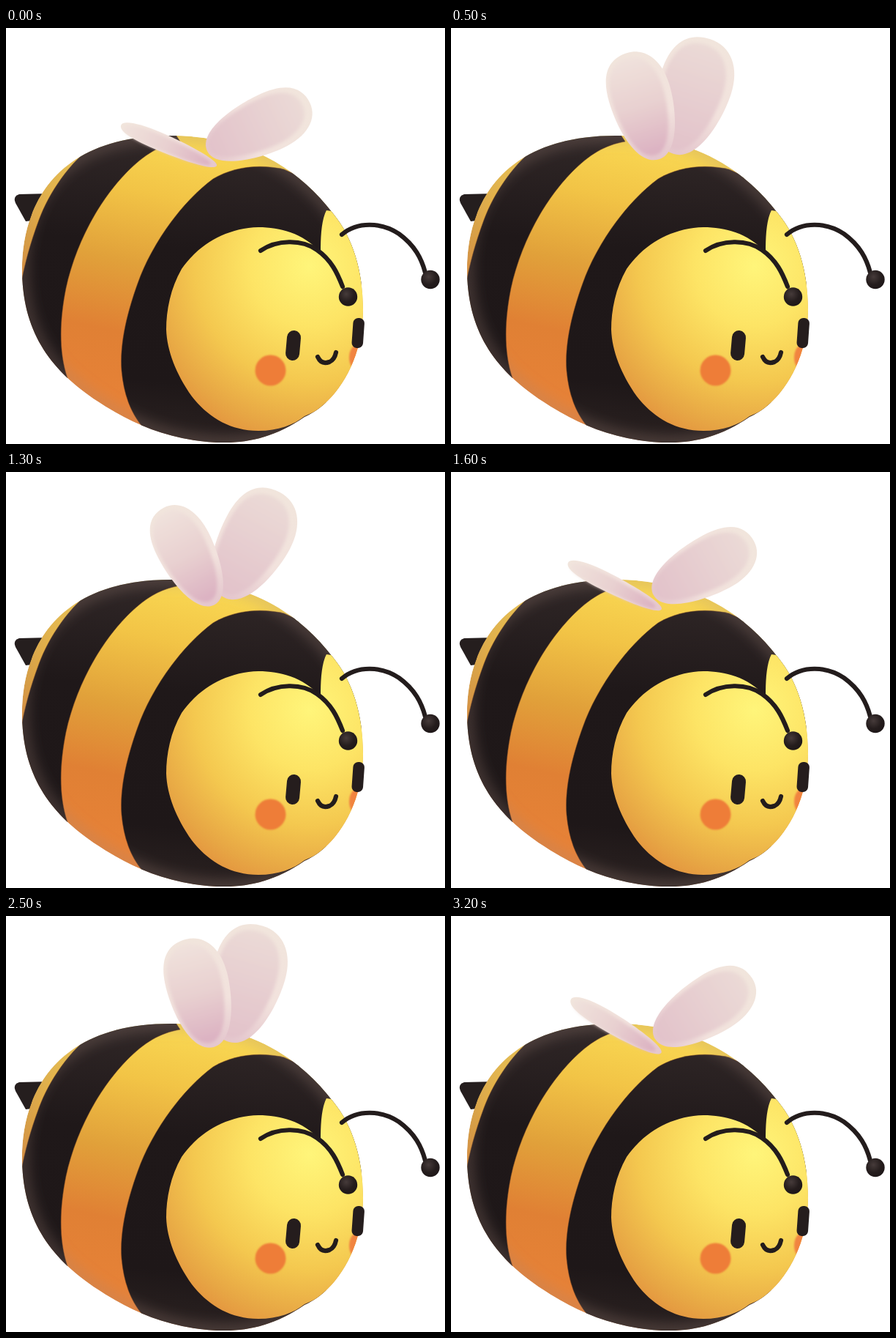
Write an HTML page that moves like this. It is 600 by 568 pixels and loops after 3.3 s.

```html
<!DOCTYPE html>
<html lang="en">
<head>
<meta charset="utf-8">
<title>Bee</title>
<style>
html, body { margin: 0; width: 100%; height: 100%; overflow: hidden; background: #fff; }
svg { display: block; width: 600px; height: 568px; }
.line { fill: none; stroke: #231c1c; stroke-width: 6.2; stroke-linecap: round; }
</style>
</head>
<body>
<svg viewBox="0 0 600 568">
  <defs>
    <path id="body" d="M22 335C20 250 62 147 225 147C330 147 400 192 446 252C473 284 488 330 488 385C488 450 455 510 408 531C370 557 335 566 300 566C240 566 190 548 150 525C75 482 24 430 22 335Z"/>
    <path id="face" d="M430 306C405 280 375 272 345 272C300 273 262 297 240 329C225 355 219 385 219 412C220 440 232 472 254 503C275 530 305 550 345 550C372 550 393 542 408 530L520 480L510 260L438 249C431 262 430 285 430 306Z"/>
    <clipPath id="inBody"><use href="#body"/></clipPath>
    <linearGradient id="coat" gradientUnits="userSpaceOnUse" x1="215" y1="150" x2="135" y2="530">
      <stop offset="0" stop-color="#f9d752"/>
      <stop offset=".2" stop-color="#f2c446"/>
      <stop offset=".45" stop-color="#e1a13a"/>
      <stop offset=".7" stop-color="#e08034"/>
      <stop offset="1" stop-color="#e88238"/>
    </linearGradient>
    <linearGradient id="dark" gradientUnits="userSpaceOnUse" x1="190" y1="150" x2="150" y2="560">
      <stop offset="0" stop-color="#302727"/>
      <stop offset=".35" stop-color="#1f1819"/>
      <stop offset=".8" stop-color="#1e1718"/>
      <stop offset="1" stop-color="#2b2221"/>
    </linearGradient>
    <radialGradient id="skin" gradientUnits="userSpaceOnUse" cx="415" cy="325" r="255">
      <stop offset="0" stop-color="#fff57a"/>
      <stop offset=".32" stop-color="#fde465"/>
      <stop offset=".62" stop-color="#f4c84f"/>
      <stop offset=".87" stop-color="#e7a644"/>
      <stop offset="1" stop-color="#e3923e"/>
    </radialGradient>
    <radialGradient id="ball" cx=".4" cy=".35" r=".7">
      <stop offset="0" stop-color="#463b3a"/>
      <stop offset=".6" stop-color="#251d1d"/>
      <stop offset="1" stop-color="#1d1617"/>
    </radialGradient>
    <linearGradient id="rim" x1="1" x2="0">
      <stop offset="0" stop-color="#f1e5dc"/>
      <stop offset=".6" stop-color="#f2e2dd"/>
      <stop offset="1" stop-color="#e4c6cd"/>
    </linearGradient>
    <linearGradient id="farPane" x1="1" x2="0">
      <stop offset="0" stop-color="#ebdad6"/>
      <stop offset="1" stop-color="#e2c2ca"/>
    </linearGradient>
    <linearGradient id="nearPane" x1="1" x2="0">
      <stop offset="0" stop-color="#f0e2dc"/>
      <stop offset=".5" stop-color="#e8d0d0"/>
      <stop offset="1" stop-color="#dbb0c1"/>
    </linearGradient>
    <filter id="soft" x="-20%" y="-30%" width="140%" height="160%"><feGaussianBlur stdDeviation="2"/></filter>
    <filter id="haze" x="-10%" y="-10%" width="120%" height="120%"><feGaussianBlur stdDeviation="9"/></filter>
    <filter id="fuzz" x="-20%" y="-20%" width="140%" height="140%"><feGaussianBlur stdDeviation="1.1"/></filter>
  </defs>

  <path d="M60 226L18 227Q9 230 13 239L27 264L60 260Z" fill="#251e1e"/>
  <g clip-path="url(#inBody)">
    <use href="#body" fill="url(#coat)"/>
    <g fill="url(#dark)" stroke="#704222" stroke-opacity=".5">
      <path d="M133 150C90 178 60 222 45 262C32 297 25 325 20 352L10 470L84 478C71 440 74 395 82 355C94 300 123 240 165 197C190 172 210 160 238 155L225 135Z"/>
      <path d="M380 193C345 185 310 190 283 206C240 238 203 291 184 338C166 385 155 430 158 468C161 500 170 525 187 545L250 580L420 570L500 300L440 220Z"/>
    </g>
    <use href="#body" fill="none" stroke="#a58b7c" stroke-opacity=".35" stroke-width="14" filter="url(#haze)"/>
    <use href="#face" fill="url(#skin)"/>
    <ellipse cx="481" cy="450" rx="12" ry="18" fill="#f18441" filter="url(#fuzz)"/>
  </g>
  <g fill="#251d1d">
    <rect x="473.500" y="396" width="15.500" height="41" rx="7" transform="rotate(4 481 416)"/>
    <rect x="383" y="413" width="19" height="41" rx="9.500" transform="rotate(5 392 434)"/>
  </g>
  <circle cx="361.500" cy="467.500" r="21" fill="#ee7d38" filter="url(#fuzz)"/>
  <path class="line" d="M426 449Q431 460 442 456Q449 453 451 443"/>
  <path class="line" d="M348 304C370 289 404 288 425 303C445 317 453 335 460 353"/>
  <path class="line" d="M459 282C480 264 513 265 537 281C559 297 568 315 573 334"/>
  <circle cx="467.500" cy="367" r="12.700" fill="url(#ball)"/>
  <circle cx="580" cy="343.500" r="12.700" fill="url(#ball)"/>
  <g id="wings"></g>
</svg>
<script>
const LOOP = 3300, STEP = 100, FLAP = LOOP / 2;

const mix = (a, b, k) => a + (b - a) * k;
const clamp = k => Math.min(1, Math.max(0, k));
const ease = k => (1 - Math.cos(Math.PI * clamp(k))) / 2;

// Each pair is the value with the wing lowered and raised; side -1 points left
const wings = [
  { name: "far", side: 1, x: [275, 305], y: [168, 172], angle: [25, 74], length: [155, 165], width: [80, 100] },
  { name: "near", side: -1, x: [288, 284], y: [188, 179], angle: [23, 75.5], length: [142, 152], width: [24, 86] }
];

// One flap: quick rise, long hold at the top, slower fall
function liftAt(t) {
  const u = t % FLAP;
  return ease((u - 225) / 315) - ease((u - 1100) / 600);
}

// Egg-shaped blade along the x axis, narrow at the hinge
function blade(from, to, half) {
  const x = k => mix(from, to, k);
  const wide = x(.62);
  return `M${from} 0C${from} ${-.7 * half} ${x(.35)} ${-half} ${wide} ${-half}` +
    `S${to} ${-.6 * half} ${to} 0S${x(.85)} ${half} ${wide} ${half}` +
    `S${from} ${.7 * half} ${from} 0Z`;
}

function addPath(fill, filter) {
  const path = document.createElementNS("http://www.w3.org/2000/svg", "path");
  path.setAttribute("fill", `url(#${fill})`);
  if (filter) path.setAttribute("filter", `url(#${filter})`);
  document.getElementById("wings").append(path);
  return path;
}

for (const wing of wings) {
  wing.edge = addPath("rim");
  wing.pane = addPath(wing.name + "Pane", "soft");
}

function drawWing(wing, lift) {
  const at = key => mix(...wing[key], lift);
  const length = at("length"), half = mix(...wing.width, ease(lift)) / 2;
  const turn = wing.side > 0 ? -at("angle") : 180 + at("angle");
  const place = (dx, dy) => `translate(${at("x") + dx} ${at("y") + dy}) rotate(${turn})`;
  wing.edge.setAttribute("d", blade(0, length, half));
  wing.edge.setAttribute("transform", place(0, 0));
  wing.pane.setAttribute("d", blade(length * .04, length * .95, half * .84));
  wing.pane.setAttribute("transform", place(-3, 0));
}

const start = performance.now();
function tick() {
  const t = (performance.now() - start) % LOOP;
  const lift = liftAt(Math.floor(t / STEP) * STEP);
  wings.forEach(wing => drawWing(wing, lift));
  requestAnimationFrame(tick);
}
tick();
</script>
</body>
</html>
```
